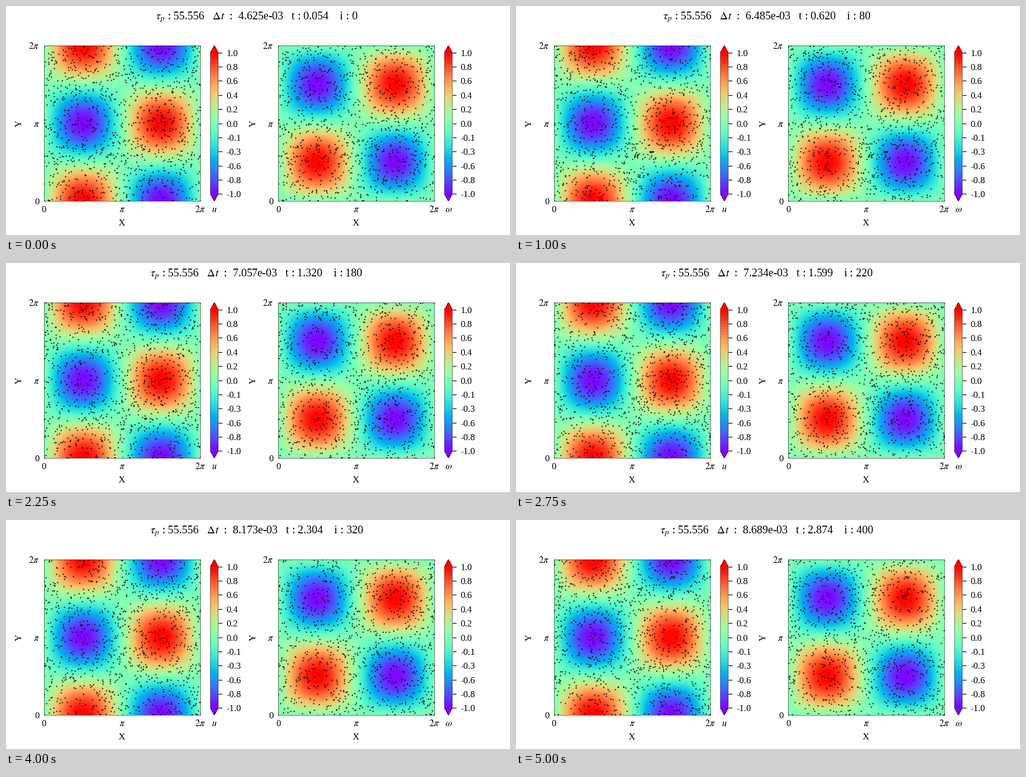
A matplotlib script that plays this animation: 900x411 px, repeating every 5250 ms.

```python
import numpy as np
import matplotlib.pyplot as plt
from matplotlib.animation import FuncAnimation

W, H, DPI = 900, 411, 100
FRAMES, INTERVAL, STEPS = 21, 250, 20
SIDE, TOP = 279, 71
TAU = 2 * np.pi

plt.rcParams.update({
    "font.family": "Liberation Serif",
    "font.size": 12,
    "mathtext.fontset": "stix",
    "axes.linewidth": 0.4,
})

fig = plt.figure(figsize=(W / DPI, H / DPI), dpi=DPI, facecolor="white")


def add_axes(x, y, w, h):
    return fig.add_axes([x / W, 1 - (y + h) / H, w / W, h / H])


def label(x, y, s, **kw):
    return fig.text(x / W, 1 - y / H, s, ha="center", va="baseline", **kw)


def panel(x, field, name):
    """Filled contours with colour bar; returns the particle artist."""
    ax = add_axes(x, TOP, SIDE, SIDE)
    cs = ax.contourf(X, Y, field, levels=np.linspace(-1, 1, 51),
                     cmap="rainbow", extend="both")
    ax.set(xlim=(0, TAU), ylim=(0, TAU))
    names = ["0", r"$\pi$", r"$2\pi$"]
    for axis in (ax.xaxis, ax.yaxis):
        axis.set_ticks([0, np.pi, TAU], labels=names)
        axis.set_ticks([np.pi / 2, 3 * np.pi / 2], minor=True)
    ax.tick_params(which="both", direction="in", top=True, right=True,
                   length=2.5, width=0.4, pad=6)
    ax.tick_params(which="minor", length=1.8)

    bar = fig.colorbar(cs, cax=add_axes(x + 297, TOP, 14, SIDE))
    bar.set_ticks(np.linspace(-1, 1, 11), labels=BAR_LABELS)
    bar.ax.tick_params(length=5, width=0.9, pad=5.2)

    label(x + 139, 394, "X")
    label(x - 40, 211, "Y", rotation=90, rotation_mode="anchor")
    label(x + 304, 370, name)
    dots, = ax.plot([], [], "o", color="black", ms=1.6, mew=0)
    return dots


BAR_LABELS = ["-1.0", "-0.8", "-0.6", "-0.3", "-0.1", "0.0",
              "0.2", "0.4", "0.6", "0.8", "1.0"]
grid = np.linspace(0, TAU, 201)
X, Y = np.meshgrid(grid, grid)
clouds = [
    panel(68, np.sin(X) * np.cos(Y), "$u$"),
    panel(486, np.sin(X) * np.sin(Y), r"$\omega$"),
]
title = label(447.5, 24, "", fontsize=14.4)

# Heavy particles keep their velocity in a periodic box.
rng = np.random.default_rng(7)
start = rng.uniform(0, TAU, (2, 1000))
speed = rng.normal(0, 0.8, (2, 1000))

# Adaptive step size and elapsed time at sampled iterations.
KNOTS = [0, 80, 140, 220, 280, 360, 400]
DT = [4.625e-3, 6.485e-3, 6.880e-3, 7.234e-3, 7.686e-3, 8.660e-3, 8.689e-3]
TIME = [0.054, 0.620, 1.040, 1.599, 2.020, 2.587, 2.874]


def update(k):
    i = k * STEPS
    t, dt = np.interp(i, KNOTS, TIME), np.interp(i, KNOTS, DT)
    pos = (start + speed * t) % TAU
    for dots in clouds:
        dots.set_data(*pos)
    title.set_text(rf"$\tau_p$ : 55.556   $\Delta t$  :  {dt:.3e}"
                   f"   t : {t:.3f}    i : {i}")
    return [*clouds, title]


anim = FuncAnimation(fig, update, frames=FRAMES, interval=INTERVAL,
                     repeat=True, repeat_delay=0, blit=False)
plt.show()
```
